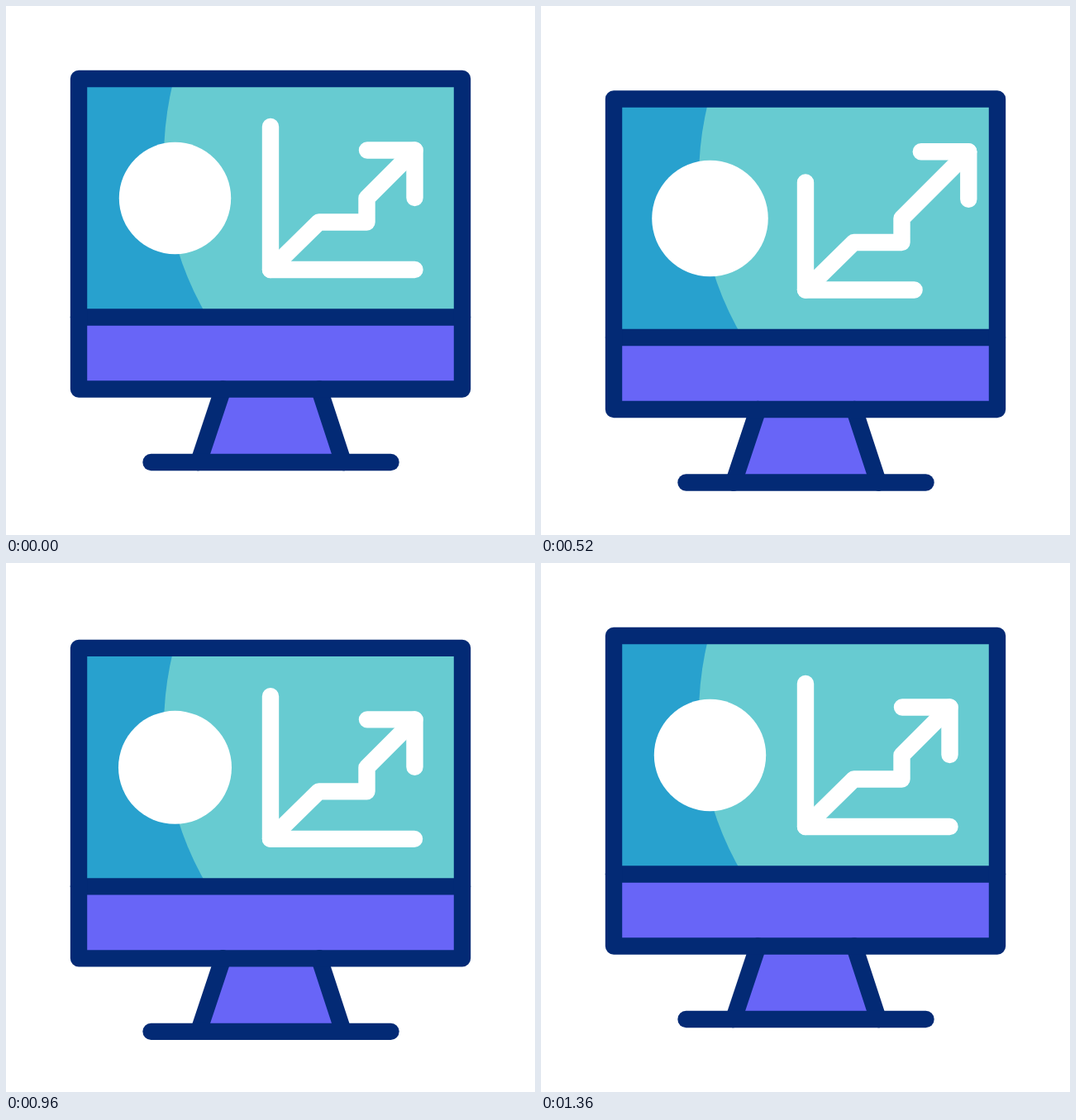
These frames come from a looping animation (640 px wide and 640 px high, 1440 ms). An HTML page with a canvas:

```html
<!DOCTYPE html>
<html lang="en">
<head>
<meta charset="utf-8">
<title>Trading monitor</title>
<style>
  html, body { margin: 0; width: 100%; height: 100%; overflow: hidden; background: #fff; }
  canvas { display: block; width: 640px; height: 640px; }
</style>
</head>
<body>
<canvas id="stage" width="640" height="640"></canvas>
<script>
const ctx = document.getElementById('stage').getContext('2d');
const LOOP = 1440, STEP = 40, LAST = 1360;
const NAVY = '#032a75', BLUE = '#28a1ce', TEAL = '#67cbd1', PURPLE = '#6865f7', WHITE = '#fff';

// Keyframes are [time, value] pairs.
const DROP = [[10, 0], [670, 26.8], [1283, 0]];
const COIN = [[413, 1], [713, 1.19], [1027, 1]];
const AXES = [[33, 0], [500, 43], [1004, 0]];
const ARROW = [[290, 0], [570, 24], [815, -4.5], [970, 0]];

// Cubic Bezier ease (.5, 0, .5, 1).
function ease(x) {
  let lo = 0, hi = 1;
  for (let i = 0; i < 24; i++) {
    const p = (lo + hi) / 2;
    if (1.5 * p * (1 - p) + p ** 3 < x) lo = p; else hi = p;
  }
  return lo * lo * (3 - 2 * lo);
}

function valueAt(keys, t) {
  if (t <= keys[0][0]) return keys[0][1];
  for (let i = 1; i < keys.length; i++) {
    const [t0, v0] = keys[i - 1], [t1, v1] = keys[i];
    if (t < t1) return v0 + (v1 - v0) * ease((t - t0) / (t1 - t0));
  }
  return keys[keys.length - 1][1];
}

function line(color, ...points) {
  ctx.strokeStyle = color;
  ctx.beginPath();
  points.forEach(([x, y]) => ctx.lineTo(x, y));
  ctx.stroke();
}

function rect(color, x, y, w, h) {
  ctx.fillStyle = color;
  ctx.fillRect(x, y, w, h);
}

function disc(color, x, y, r) {
  ctx.fillStyle = color;
  ctx.beginPath();
  ctx.arc(x, y, r, 0, Math.PI * 2);
  ctx.fill();
}

function drawMonitor() {
  ctx.save();
  ctx.beginPath();
  ctx.rect(88, 88, 464, 288.5);
  ctx.clip();
  rect(BLUE, 88, 88, 464, 288.5);
  disc(TEAL, 569, 183.5, 378);
  ctx.restore();
  rect(PURPLE, 88, 376.5, 464, 87);

  ctx.fillStyle = PURPLE;
  ctx.beginPath();
  ctx.moveTo(262.5, 463.5);
  ctx.lineTo(379, 463.5);
  ctx.lineTo(408, 552);
  ctx.lineTo(233, 552);
  ctx.fill();

  line(NAVY, [262.5, 463.5], [233, 552]);
  line(NAVY, [379, 463.5], [408, 552]);
  line(NAVY, [175.5, 552], [465.5, 552]);
  line(NAVY, [88, 376.5], [552, 376.5]);
  ctx.strokeRect(88, 88, 464, 375.5);
}

function drawChart(shrink, shift) {
  line(WHITE, [320, 146 + shrink], [320, 319], [494.5 - shrink, 319]);
  const x = 494.5 + shift, y = 174.5 - shift;
  line(WHITE, [320, 319], [378.5, 261.5], [436.5, 261.5], [436.5, 232.5], [x, y]);
  line(WHITE, [x - 57.5, y], [x, y], [x, y + 57.5]);
}

function draw(t) {
  rect(WHITE, 0, 0, 640, 640);
  ctx.save();
  ctx.translate(0, valueAt(DROP, t));
  ctx.lineWidth = 20.4;
  ctx.lineCap = ctx.lineJoin = 'round';
  drawMonitor();
  disc(WHITE, 204.5, 232.5, 57.5 * valueAt(COIN, t) + 10.2);
  drawChart(valueAt(AXES, t), valueAt(ARROW, t));
  ctx.restore();
}

const start = performance.now();
function tick() {
  const t = (performance.now() - start) % LOOP;
  draw(Math.min(LAST, Math.floor(t / STEP) * STEP));
  requestAnimationFrame(tick);
}
tick();
</script>
</body>
</html>
```
